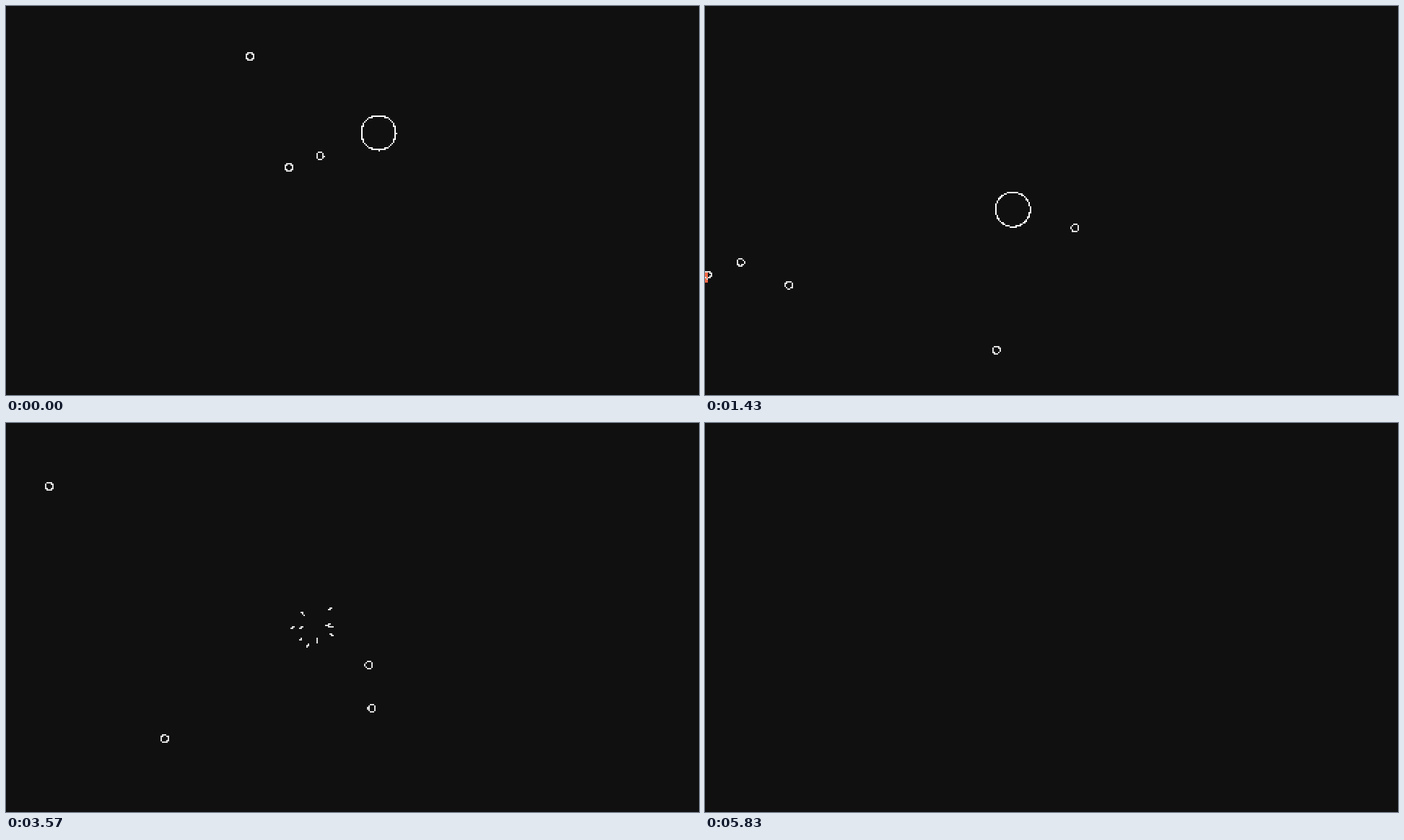
An HTML page with a canvas that plays this animation: 960 by 540 pixels, repeating every 6.06 s.

```html
<!DOCTYPE html>
<html lang="en">
<head>
<meta charset="utf-8">
<title>Pixel shooter</title>
<style>
  html, body { margin: 0; width: 100%; height: 100%; overflow: hidden; background: #101010; }
  canvas { display: block; width: 960px; height: 540px; image-rendering: pixelated; }
</style>
</head>
<body>
<canvas id="stage" width="480" height="270"></canvas>
<script>
const ctx = document.getElementById('stage').getContext('2d');
const LOOP = 6060, TICK = 100 / 3, TICKS = 183;
const W = 960, H = 540;
const SHIP_SPEED = 20 / 3, SHOT_SPEED = 40 / 3;
const DEATH = 81;
const BACK = '#101010', PALE = '#dedede', WHITE = '#ffffff', ORANGE = '#f16745';
const rad = deg => deg * Math.PI / 180;

// Ship path: tick, x, y, heading in degrees
const path = [
  [1, 516, 176, 159], [21.5, 388, 225, 159], [28, 362, 257, 98],
  [37.5, 394, 298, 5], [45, 434, 271, -64], [52, 442, 225, -94],
  [59, 414, 194, -165], [66, 372, 211, -235], [73.5, 377, 259, -309],
  [79, 406, 280, -325], [81, 417, 288, -325]
];

// Shots: first tick, then a known game time, x, y and heading
const shots = [
  [-20, 1, 338, 70, 194.2], [-13, 1, 392, 224, 159], [-6, 1, 435, 208, 159],
  [2, 28, 146, 318, 159], [9, 28, 190, 301.5, 159], [16, 28, 236, 284, 159],
  [22, 28, 288, 285, 149.1], [30, 30, 368, 308, 78], [37, 59, 725, 326, 4.8],
  [45, 59, 534, 65, -64], [52, 59, 432, 94, -94], [59, 59, 376, 184, 195.2],
  [66, 79, 250, 385, 125], [73, 79, 448, 346, 50.8], [80, 79, 430.4, 300, 35.7]
].map(([born, ref, x, y, deg]) => ({ born, ref, x, y, a: rad(deg) }));

// Debris offsets four game ticks after the blast
const debris = [
  [-15, -16], [23, -23], [-29, 3], [-18, 3], [20, -1],
  [24, 2], [25, 13], [-18, 19], [-8, 28], [5, 21]
];
const blast = { x: 414, y: 288 };

const easeInOut = u => u < 0.5 ? 4 * u ** 3 : 1 - 4 * (1 - u) ** 3;

// Game time per tick: slow motion after the death eases back on its own slowed clock
const START = 80.5;
const clock = (() => {
  const out = [];
  let g = 0;
  for (let i = 0; i <= TICKS * 2; i++) {
    if (i % 2 === 0) out.push(g);
    const u = Math.min(1, Math.max(0, (g - START) / 30));
    g += 0.5 * (i / 2 < START ? 1 : 0.15 + 0.85 * easeInOut(u));
  }
  return out;
})();

function shotAt(s, g) {
  const d = (g - s.ref) * SHOT_SPEED;
  return { x: s.x + d * Math.cos(s.a), y: s.y + d * Math.sin(s.a) };
}

for (const s of shots) {
  for (let k = Math.max(1, s.born); k < TICKS; k++) {
    const p = shotAt(s, clock[k]);
    if (p.x < 0 || p.x > W || p.y < 0 || p.y > H) {
      s.end = k;
      s.hit = p;
      break;
    }
  }
}

function shipAt(k) {
  let i = 0;
  while (i < path.length - 2 && path[i + 1][0] <= k) i++;
  const [t0, x0, y0, d0] = path[i], [t1, x1, y1, d1] = path[i + 1];
  const dt = t1 - t0, u = (k - t0) / dt, v = 1 - u, m = SHIP_SPEED * dt;
  const mix = (p, q, a, b) =>
    (1 + 2 * u) * v * v * p + u * v * v * m * a + u * u * (3 - 2 * u) * q - u * u * v * m * b;
  return {
    x: mix(x0, x1, Math.cos(rad(d0)), Math.cos(rad(d1))),
    y: mix(y0, y1, Math.sin(rad(d0)), Math.sin(rad(d1))),
    a: rad(d0 + (d1 - d0) * u)
  };
}

// Drawing helpers take stage coordinates and fill half-size cells
let shift = { x: 0, y: 0 };
const cell = (x, y) => ctx.fillRect(Math.floor(x), Math.floor(y), 1, 1);
const toGrid = p => [(p.x + shift.x) / 2, (p.y + shift.y) / 2];

function ring(p, r, color) {
  const [x, y] = toGrid(p), n = Math.ceil(r * 10);
  ctx.fillStyle = color;
  for (let i = 0; i < n; i++) {
    const a = i / n * 2 * Math.PI;
    cell(x + r * Math.cos(a), y + r * Math.sin(a));
  }
}

function square(p, color) {
  const [x, y] = toGrid(p);
  ctx.fillStyle = color;
  ctx.fillRect(Math.round(x - 4), Math.round(y - 4), 8, 8);
}

function tilted(p, size, angle) {
  const [x, y] = toGrid(p), c = Math.cos(angle), s = Math.sin(angle);
  ctx.fillStyle = PALE;
  for (let j = Math.floor(y) - 6; j < y + 6; j++) {
    for (let i = Math.floor(x) - 6; i < x + 6; i++) {
      const dx = i + 0.5 - x, dy = j + 0.5 - y;
      if (Math.max(Math.abs(dx * c + dy * s), Math.abs(dy * c - dx * s)) <= size / 2) cell(i, j);
    }
  }
}

function dash(p, angle, len) {
  const [x, y] = toGrid(p);
  ctx.fillStyle = PALE;
  for (let d = -len / 2; d <= len / 2; d += 0.25) {
    cell(x + d * Math.cos(angle), y + d * Math.sin(angle));
  }
}

function drawDebris(age) {
  debris.forEach(([dx, dy], i) => {
    const life = i === 1 ? 11.5 : 9 + i % 3 * 0.5;
    if (age >= life) return;
    const reach = t => t - t * t / (2 * life);
    const f = reach(age) / reach(4);
    dash({ x: blast.x + dx * f, y: blast.y + dy * f }, Math.atan2(dy, dx), 4.5 * (1 - age / life));
  });
}

function drawShip(k) {
  const ship = shipAt(k);
  ring(ship, 12, WHITE);
  for (const s of shots) {
    const age = k - s.born;
    if (age < 0 || age > 1) continue;
    const p = { x: ship.x + 25 * Math.cos(ship.a), y: ship.y + 25 * Math.sin(ship.a) };
    tilted(p, 8 * (1 - easeInOut((age + 0.3) / 3)), ship.a + Math.PI / 4);
  }
}

function draw(k) {
  ctx.fillStyle = BACK;
  ctx.fillRect(0, 0, 480, 270);
  // the whole picture blinks out at the moment of death
  if (k === DEATH || k === DEATH + 1) return;

  const g = clock[k];
  const kick = k < DEATH ? 0 : Math.max(0, 1 - (k - 80) / 80);
  shift = { x: 18.5 * kick, y: -10.5 * kick };

  for (const s of shots) {
    if (k < s.born) continue;
    if (s.end === undefined || k < s.end) {
      ring(shotAt(s, g), 2.5, PALE);
    } else {
      const age = g - clock[s.end];
      if (age < 6.8) square(s.hit, age < 2.9 ? PALE : ORANGE);
    }
  }
  if (k < DEATH) drawShip(k);
  else drawDebris(g - START);
}

const begin = performance.now();
function frame() {
  const t = (performance.now() - begin) % LOOP;
  draw(Math.max(1, Math.floor(t / TICK + 0.15)));
  requestAnimationFrame(frame);
}
frame();
</script>
</body>
</html>
```
